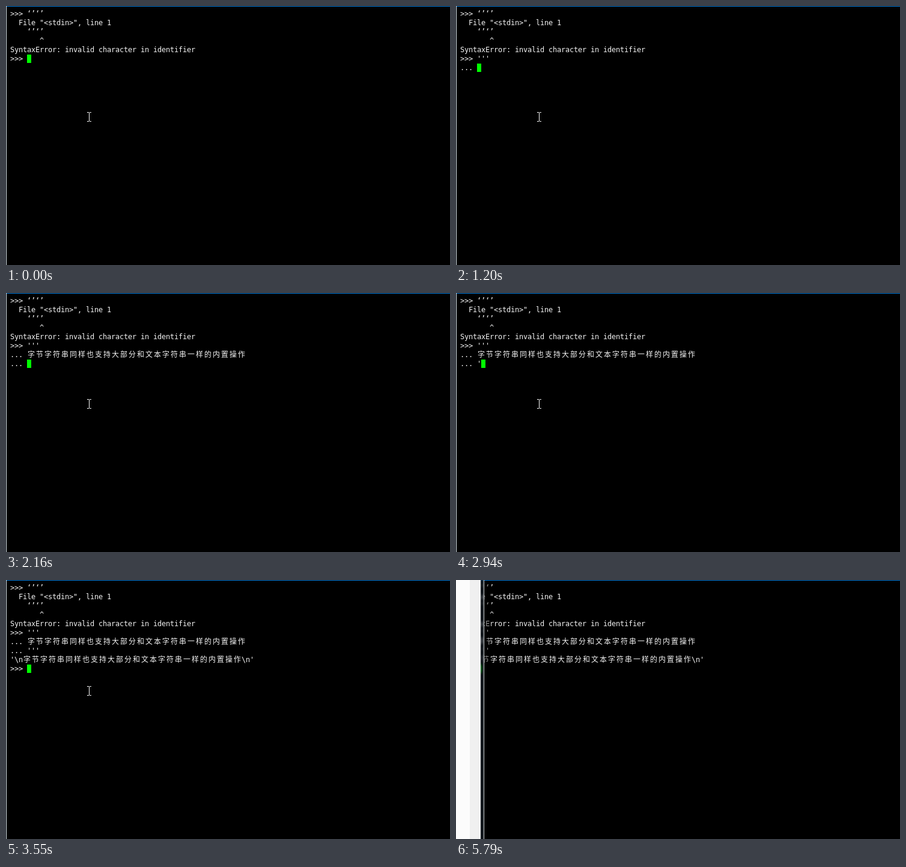
Write an HTML page with a canvas that moves like this. It is 739x432 px and loops after 8000 ms.

```html
<!DOCTYPE html>
<html lang="zh-CN">
<head>
<meta charset="utf-8">
<style>
  html, body { margin: 0; width: 100%; height: 100%; overflow: hidden; background: #000; }
  canvas { display: block; }
</style>
</head>
<body>
<canvas id="stage" width="739" height="432"></canvas>
<script>
const stage = document.getElementById('stage');
const g = stage.getContext('2d', { alpha: false });
const LOOP = 8000, CELL = 7, LINE = 15, LEFT = 7, TOP = 6;
const SENTENCE = '字节字符串同样也支持大部分和文本字符串一样的内置操作';
const LATIN = '12px "DejaVu Sans Mono", monospace';
const CJK = '12px "Noto Sans CJK SC", "Noto Sans CJK", sans-serif';
const HISTORY = [
  '>>> ‘’‘’',
  '  File "<stdin>", line 1',
  '    ‘’‘’',
  '       ^',
  'SyntaxError: invalid character in identifier',
  '>>> '
];
// Each entry: time, text added to the session
const INPUT = [
  [500, "'"], [650, "'"], [930, "'"], [1200, '\n... '],
  [1880, SENTENCE], [2160, '\n... '],
  [2940, "'"], [3090, "'"], [3240, "'"],
  [3550, `\n'\\n${SENTENCE}\\n'\n>>> `]
];

function rect(color, x, y, w, h) {
  g.fillStyle = color;
  g.fillRect(x, y, w, h);
}

// Draws one line on the character grid and returns the x after it
function drawLine(text, y) {
  let x = LEFT;
  g.fillStyle = '#f4f4f4';
  for (const ch of text) {
    const wide = ch >= '一';
    g.font = wide ? CJK : LATIN;
    g.fillText(ch, wide ? x + 1 : x, y + 11);
    x += wide ? 2 * CELL : CELL;
  }
  return x;
}

function drawTerminal(t) {
  rect('#000', 0, 0, 739, 432);
  const typed = INPUT.filter(([at]) => t >= at).map(([, text]) => text).join('');
  const lines = (HISTORY.join('\n') + typed).split('\n');
  let end;
  lines.forEach((text, row) => end = drawLine(text, TOP + row * LINE));
  rect('#0f0', end, TOP + (lines.length - 1) * LINE, CELL, 14);
  rect('#0078d7', 0, 0, 739, 1);
  rect('#d4e0e8', 0, 0, 1, 432);
}

function drawPointer(x, y) {
  for (const edge of [y, y + 15]) {
    rect('#fff', x, edge, 3, 1);
    rect('#fff', x + 4, edge, 3, 1);
  }
  rect('#fff', x + 3, y + 1, 1, 14);
}

// Another window slides over the left side, with a blurred glass edge
function drawOverlay() {
  g.save();
  g.beginPath();
  g.rect(41, 0, 5, 432);
  g.clip();
  g.filter = 'blur(2px)';
  g.drawImage(stage, 0, 0);
  g.filter = 'none';
  rect('rgba(40, 50, 60, 0.5)', 41, 0, 5, 432);
  g.restore();
  const shade = g.createLinearGradient(47, 0, 61, 0);
  shade.addColorStop(0, 'rgba(0, 0, 0, 0.6)');
  shade.addColorStop(1, 'rgba(0, 0, 0, 0)');
  rect(shade, 47, 1, 14, 431);
  rect('#fcfcfc', 0, 0, 23, 432);
  rect('#f0f0f0', 23, 0, 18, 432);
  rect('#d4d8da', 46, 0, 1, 432);
}

function frame(now) {
  const t = now % LOOP;
  drawTerminal(t);
  if (t < 3960) drawPointer(135, 177);
  else if (t < 4110) drawPointer(124, 86);
  if (t >= 5790) drawOverlay();
  requestAnimationFrame(frame);
}
frame(0);
</script>
</body>
</html>
```
